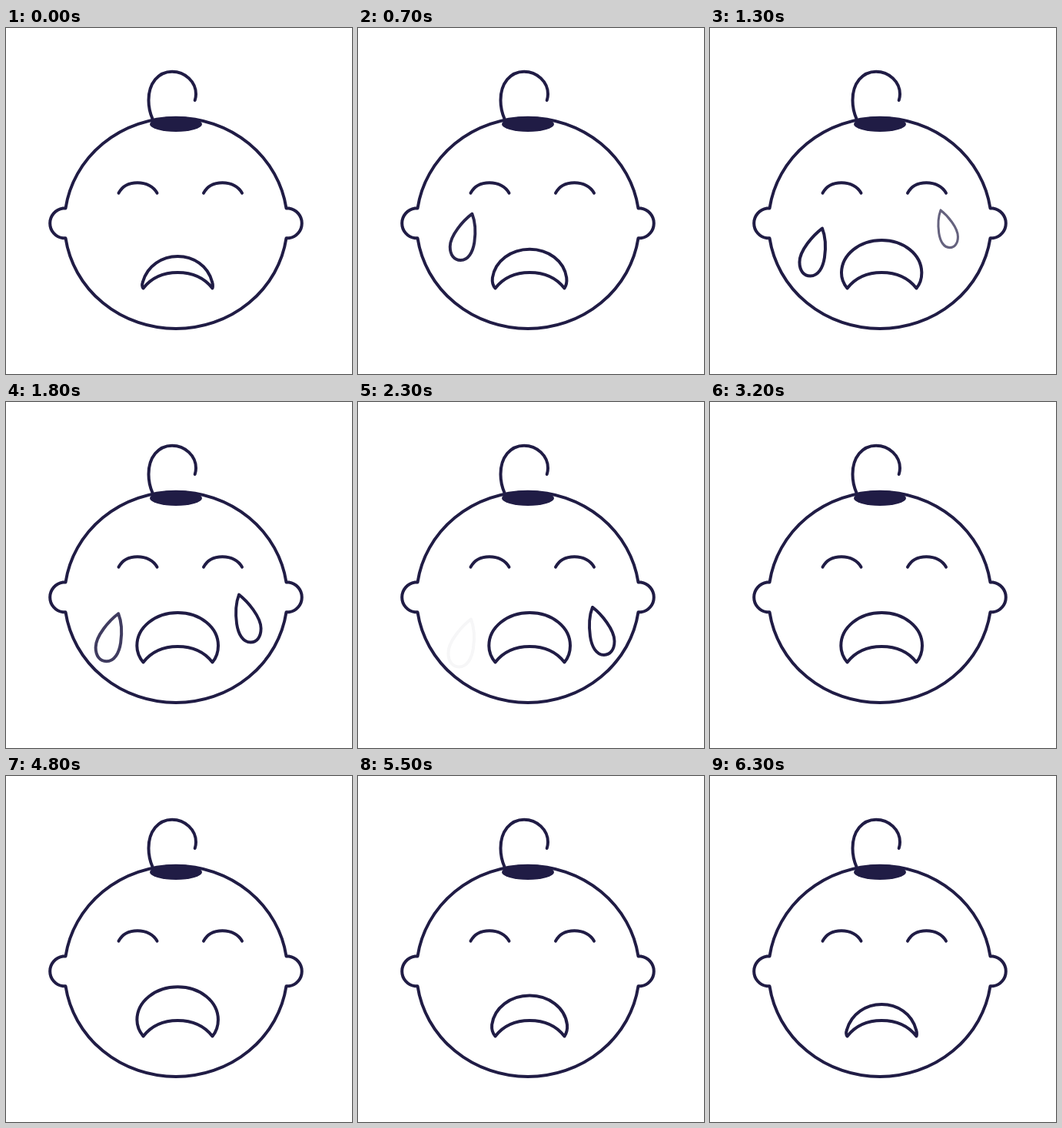
Animation of 450x450 px, one loop 6.4 s. Source, as an HTML page:

```html
<!DOCTYPE html>
<html lang="en">
<head>
<meta charset="utf-8">
<title>Crying baby</title>
<style>
  html, body { margin: 0; width: 100%; height: 100%; overflow: hidden; background: #fff; }
  svg { display: block; width: 100%; height: 100%; }
</style>
</head>
<body>
<svg viewBox="0 0 450 450" fill="none" stroke="#201c45" stroke-width="4" stroke-linecap="round" stroke-linejoin="round">
  <defs>
    <path id="eye" d="M146.5 214.7C151 206 160 201.2 171 201.2S192 206 196.5 214.7"/>
    <path id="drop" d="M0 0C-12 9 -29.5 29 -29.5 44C-29.5 55 -24 62 -15.5 62C-5 62 1 51 3 38C5 24 4 10 0 0Z"/>
  </defs>
  <path d="M77.5 234.5A145 137.5 0 0 1 364.5 234.5H368A19.6 19.6 0 0 1 368 273.3H364.5A145 137.5 0 0 1 77.5 273.3H74A19.6 19.6 0 0 1 74 234.5Z"/>
  <ellipse cx="221" cy="125" rx="34" ry="10" fill="#201c45" stroke="none"/>
  <path d="M190.5 118C187 110 185.5 101 185.5 94C185.5 72 198 56.7 216 56.7C233 56.7 247 70 247 86Q247 90 245.7 94"/>
  <use href="#eye"/>
  <use href="#eye" x="110.5"/>
  <path id="mouth"/>
  <use id="left" href="#drop"/>
  <use id="right" href="#drop"/>
</svg>
<script>
const LOOP = 6400, STEP = 100;
const [mouth, left, right] = ['mouth', 'left', 'right'].map(id => document.getElementById(id));

// Sine ease-in-out of t between start and end, from 0 to 1
const ease = (t, start, end) => {
  const p = Math.min(1, Math.max(0, (t - start) / (end - start)));
  return (1 - Math.cos(Math.PI * p)) / 2;
};

// Upper lip as x, y pairs
const shut = [176.5, 336.5, 177, 333, 178, 330, 184, 309, 203, 297, 223.3, 297,
  243.6, 297, 262.6, 309, 268, 330, 269, 333, 269.3, 336, 268.5, 338.5];
const wide = [173, 332, 170.3, 325, 170.3, 317, 170.3, 293, 194, 274, 223.3, 274,
  252.6, 274, 276, 293, 276, 317, 276, 325, 274, 332, 268.5, 338.5];

function drawMouth(open) {
  const lip = shut.map((v, i) => (v + (wide[i] - v) * open).toFixed(2)).join(' ');
  mouth.setAttribute('d', `M178.5 338.5C${lip}C258 325 242 318 223.3 318S189 325 178.5 338.5Z`);
}

function drawTear(el, t, flip, pathX) {
  const fall = ease(t, 0, 2400), grow = ease(t, 0, 800);
  const scale = 0.3 + 0.7 * grow;
  el.setAttribute('transform',
    `translate(${pathX(fall)} ${231.7 + 51 * fall}) scale(${flip * scale} ${scale})`);
  el.setAttribute('opacity', grow * (1 - ease(t, 1600, 2400)));
}

function render(t) {
  drawMouth(ease(t, 0, 1600) - ease(t, 4700, 6300));
  drawTear(left, t, 1, p => 151 - 15.3 * p + 11.25 * p * p);
  drawTear(right, t - 800, -0.97, p => 298.5 + 15.5 * p - 9 * p * p);
}

const start = performance.now();
function tick() {
  const t = (performance.now() - start) % LOOP;
  render(Math.floor(t / STEP) * STEP);
  requestAnimationFrame(tick);
}
render(0);
requestAnimationFrame(tick);
</script>
</body>
</html>
```
